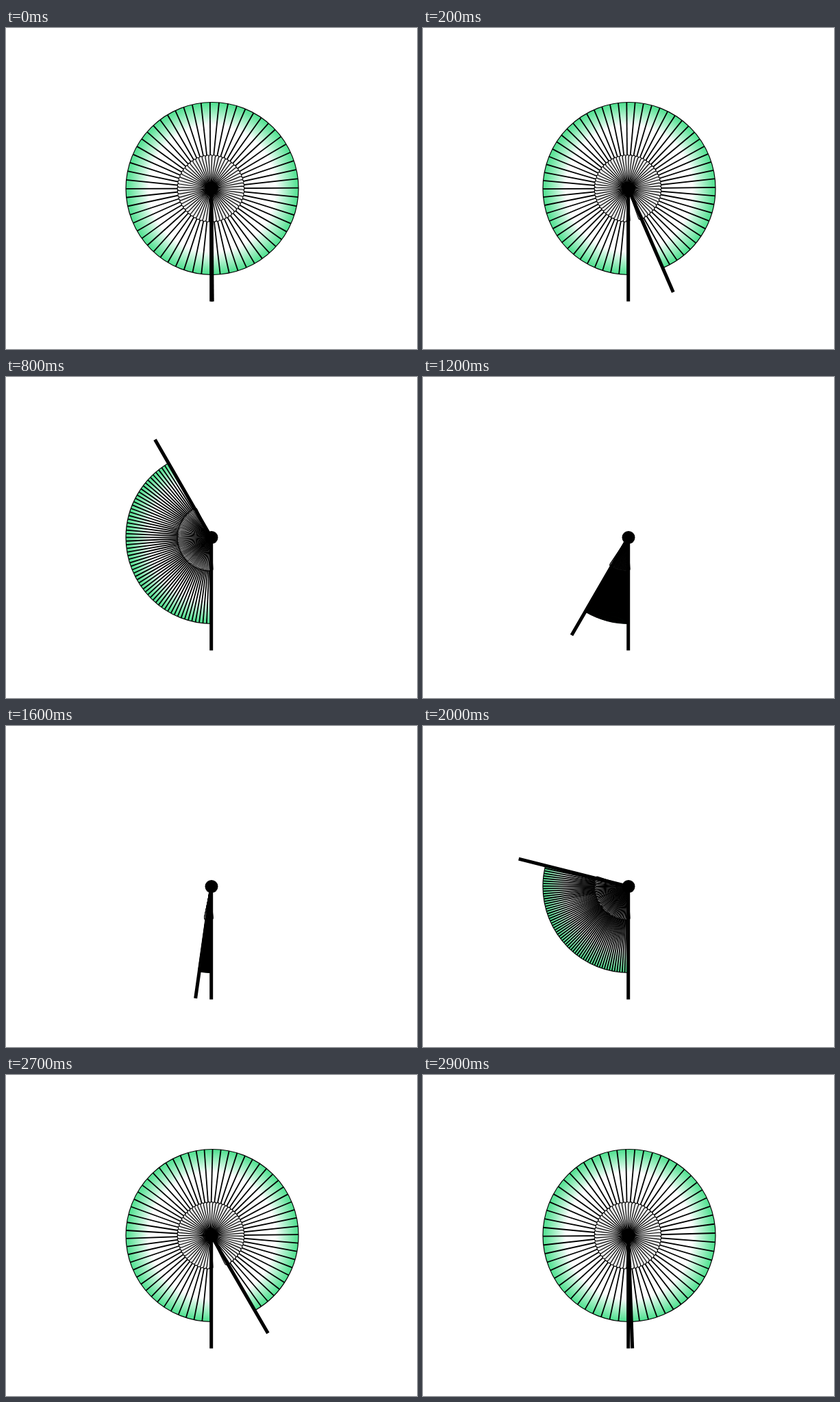
An HTML page with a canvas for the animation above (3000 ms loop, 600 by 469 pixels).

```html
<!DOCTYPE html>
<html>
<head>
<meta charset="utf-8">
<style>
html, body { margin: 0; overflow: hidden; background: #fff; }
canvas { display: block; }
</style>
</head>
<body>
<canvas id="stage" width="600" height="469"></canvas>
<script>
const ctx = document.getElementById('stage').getContext('2d');
const LOOP = 3000, STEP = 100, RIBS = 60;
const CY = 234.5, LEAF_X = 301, RIB_X = 298.4, BLADE_X = 299, PIVOT_X = 299.7;
const LEAF = 126, BLADE = 49, GUARD = 165;
const DOWN = Math.PI / 2;

const leafFill = ctx.createRadialGradient(0, 0, 92, 0, 0, LEAF);
leafFill.addColorStop(0, '#fff');
leafFill.addColorStop(1, '#4be08d');

// Opening angle: eased shut over half the loop, then eased open again.
function spread(ms) {
  const t = (Math.floor(ms / STEP) + 1 / 3) * STEP % LOOP;
  const x = 1 - Math.abs(1 - t / (LOOP / 2));
  return 2 * Math.PI * (1 - x * x * (3 - 2 * x));
}

// Draws a part that hangs straight down from (x, CY), turned clockwise.
function hang(x, angle, part) {
  ctx.save();
  ctx.translate(x, CY);
  ctx.rotate(angle);
  part();
  ctx.restore();
}

function line(length, width) {
  ctx.lineWidth = width;
  ctx.beginPath();
  ctx.moveTo(0, 0);
  ctx.lineTo(0, length);
  ctx.stroke();
}

const rib = () => line(LEAF + 5, 1.8);
const guard = () => line(GUARD, 5);

function blade() {
  ctx.beginPath();
  ctx.moveTo(0, 0);
  ctx.lineTo(-3, BLADE - 3);
  ctx.arc(0, BLADE - 3, 3, Math.PI, 0, true);
  ctx.closePath();
  ctx.lineWidth = 1.2;
  ctx.fill();
  ctx.stroke();
}

function sector(angle) {
  ctx.beginPath();
  ctx.moveTo(0, 0);
  ctx.arc(0, 0, LEAF, DOWN, DOWN + angle);
}

function drawFan(angle) {
  const angles = Array.from({ length: RIBS + 1 }, (_, i) => i * angle / RIBS);
  ctx.clearRect(0, 0, 600, 469);
  ctx.strokeStyle = '#000';

  hang(LEAF_X, 0, () => {
    sector(angle);
    ctx.fillStyle = leafFill;
    ctx.fill();
  });

  ctx.save();
  ctx.beginPath();
  ctx.arc(LEAF_X, CY, LEAF, 0, 2 * Math.PI);
  ctx.clip();
  angles.forEach(a => hang(RIB_X, a, rib));
  ctx.restore();

  hang(LEAF_X, 0, () => {
    ctx.beginPath();
    ctx.arc(0, 0, LEAF, DOWN, DOWN + angle);
    ctx.lineWidth = 1.2;
    ctx.stroke();
  });

  ctx.fillStyle = '#eee';
  angles.forEach(a => hang(BLADE_X, a, blade));

  hang(PIVOT_X, 0, guard);
  hang(PIVOT_X, angle, guard);
  ctx.beginPath();
  ctx.arc(300, CY, 9.5, 0, 2 * Math.PI);
  ctx.fillStyle = '#000';
  ctx.fill();
}

function frame() {
  drawFan(spread(performance.now() % LOOP));
  requestAnimationFrame(frame);
}
frame();
</script>
</body>
</html>
```
